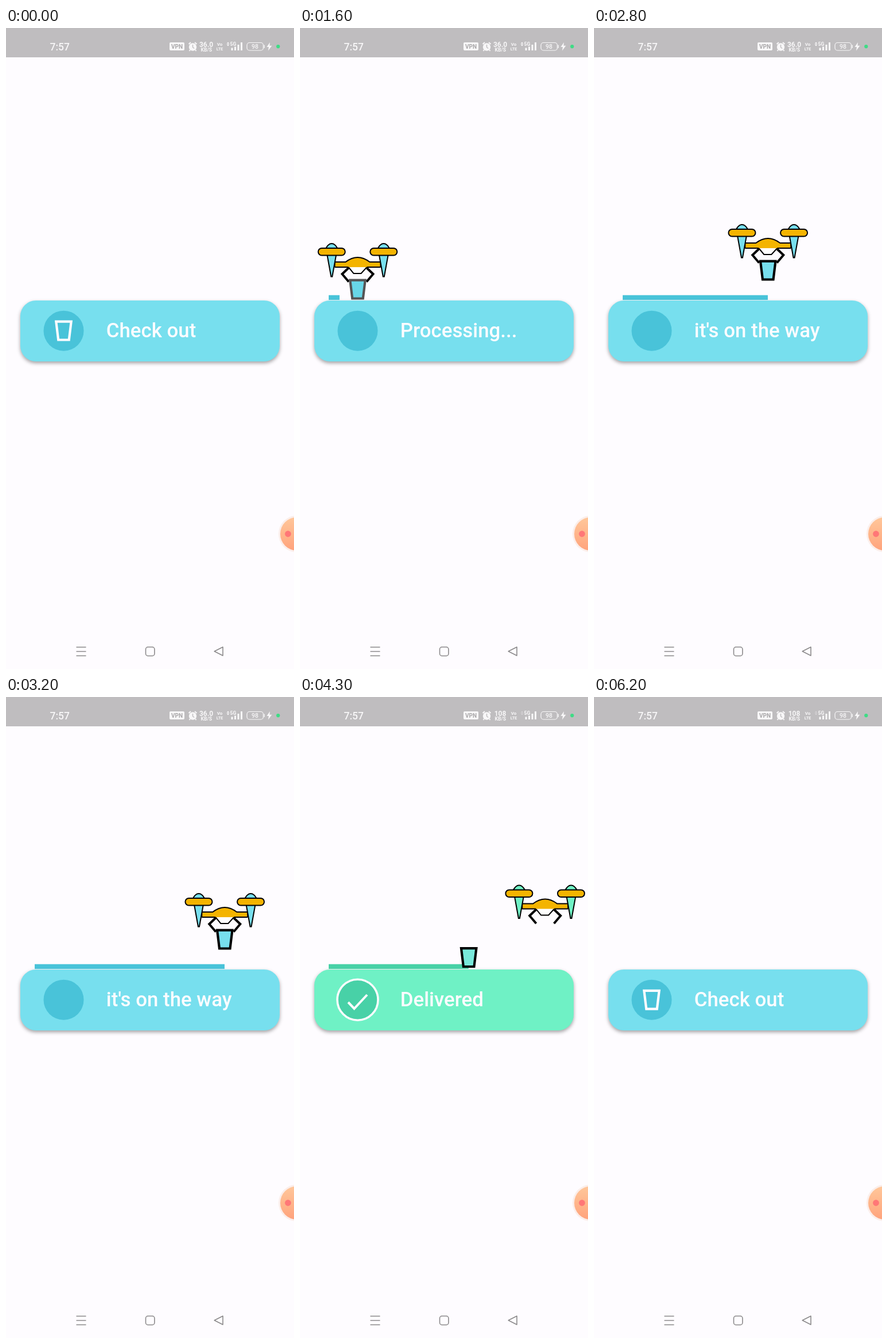
An HTML page for the animation above (6.4 s loop, 502 by 1115 pixels).

```html
<!DOCTYPE html>
<html lang="en">
<head>
<meta charset="utf-8">
<style>
html, body { margin: 0; width: 100%; height: 100%; overflow: hidden; background: #fefcff; }
svg { display: block; width: 502px; height: 1115px; font-family: Roboto, Inter, sans-serif; --main: #77dfee; --deep: #49c3d9; }
svg.done { --main: #6ff1c5; --deep: #48d1a7; }
#button { fill: var(--main); filter: drop-shadow(0 3px 3px rgba(0,0,0,.36)); }
#bar, #disc { fill: var(--deep); }
.done #disc { stroke: #fefcff; stroke-width: 3.6; r: 35.5px; }
#tick { display: none; }
.done #tick { display: inline; }
#label { font-size: 34.8px; font-weight: 500; fill: #fefcff; }
.blue { fill: var(--main); }
.gold { fill: #f4b400; }
#status { fill: #f8f7f8; font-weight: 700; }
</style>
</head>
<body>
<svg viewBox="0 0 502 1115">
  <defs>
    <linearGradient id="peach" x2="0" y2="1">
      <stop stop-color="#ffc79a"/><stop offset="1" stop-color="#ffa37c"/>
    </linearGradient>
    <g id="rotor" stroke="#000" stroke-width="2">
      <path class="blue" d="M-8 20H8L1 58.5H-1Z"/>
      <path class="blue" d="M-10.5 10Q-6 1 0 1T10.5 10Z"/>
      <rect class="gold" x="-23.5" y="9" width="47" height="12.5" rx="6.2"/>
    </g>
    <path id="arm" d="M16 43.5L27 54L15.5 67.5" fill="none" stroke="#000" stroke-width="4"/>
  </defs>
  <rect width="502" height="1115" fill="#fefcff"/>

  <rect id="button" x="25" y="474" width="452" height="106" rx="27"/>
  <circle id="disc" cx="100.5" cy="526.7" r="35"/>
  <path id="tick" d="M84 531L94.5 542L117 518" fill="none" stroke="#fefcff" stroke-width="4"/>
  <text id="label" x="174.8" y="538"></text>
  <rect id="bar" x="50" y="464.7" width="0" height="8.3"/>

  <g id="drone">
    <path d="M-16 42L-7 53H6L16 42" fill="#fff" stroke="#000" stroke-width="2"/>
    <path class="gold" d="M-40 33H-21Q0 17 21 33H40V42H-40Z"/>
    <path d="M-40 42V33H-21Q0 17 21 33H40V42M-40 42H-16M16 42H40" fill="none" stroke="#000" stroke-width="2"/>
    <use href="#rotor" x="-45.3"/><use href="#rotor" x="45.3"/>
    <use href="#arm"/><use href="#arm" transform="scale(-1 1)"/>
  </g>
  <path id="cup" d="M-13.2 2.2H13.2L9.3 34H-9.3Z" stroke-width="4.2"/>

  <rect width="502" height="51" fill="#bfbdbf"/>
  <g id="status">
    <text x="76.5" y="38.6" font-size="17.5" font-weight="500">7:57</text>
    <rect x="285" y="25" width="26" height="14" rx="2"/>
    <text x="298" y="35.7" font-size="10" text-anchor="middle" fill="#aaa8aa">VPN</text>
    <circle cx="325.5" cy="33" r="6.7"/>
    <path d="M318.5 28L322 25M332.5 28L329 25M321 38L319.5 40M330 38L331.5 40" stroke="#f8f7f8" stroke-width="2"/>
    <path d="M325.5 29V33.5L328 35.5" fill="none" stroke="#bfbdbf" stroke-width="1.4"/>
    <g text-anchor="middle">
      <text id="rate" x="349" y="33" font-size="12"></text>
      <text x="349.3" y="41" font-size="8.6">KB/S</text>
      <text x="372.5" y="31.3" font-size="8">Vo</text>
      <text x="372.5" y="39.2" font-size="7">LTE</text>
      <text x="396" y="31.3" font-size="8.6">5G</text>
      <text x="434" y="36.2" font-size="10.5" font-weight="500">98</text>
    </g>
    <path id="arrows" d="M384.5 27.2L387 24.4L389.5 27.2ZM384.5 28.6L387 31.4L389.5 28.6Z"/>
    <path d="M392.5 39V34.5H395.5V39ZM398 39V32.5H401V39ZM403.5 39V29H406.5V39ZM409 39V25H412V39Z"/>
    <rect x="420" y="25.5" width="28.5" height="13.5" rx="4.5" fill="none" stroke="#f8f7f8" stroke-width="1.2"/>
    <path d="M449.7 29.5V35H451V29.5ZM460 25L454.5 33H458L457 39.5L463.5 30.8H459.5Z"/>
    <circle cx="474.3" cy="32.2" r="3.1" fill="#3edc85"/>
  </g>

  <circle cx="507" cy="880" r="32" fill="#fbeeea"/>
  <circle cx="507" cy="880" r="29" fill="url(#peach)"/>
  <circle cx="491.5" cy="880" r="5.4" fill="#ff7777"/>
  <g fill="none" stroke="#8b898b" stroke-width="1.6">
    <path d="M122.5 1077H139.5M122.5 1084.5H139.5M122.5 1092H139.5"/>
    <rect x="243.5" y="1076.8" width="15.4" height="15.4" rx="4"/>
    <path d="M363.2 1084.3L378 1076.8V1091.8Z" stroke-linejoin="round"/>
  </g>
</svg>
<script>
const $ = id => document.getElementById(id);
const svg = document.querySelector('svg');
const LOOP = 6400, STEP = 100, REST = 508.5, GROUND = 374, HANG = 62.5;
const RELEASE = 3850, GREEN = 3450, BLUE = 4950;

// progress of t through a..b, limited to 0..1
const ramp = (t, a, b) => Math.min(1, Math.max(0, (t - a) / (b - a)));
const smooth = u => u * u * (3 - 2 * u);
const mix = (a, b, k) => `rgb(${a.map((v, i) => Math.round(v + (b[i] - v) * k))})`;
const place = (id, x, y) => $(id).setAttribute('transform', `translate(${x} ${y})`);

function labelAt(t) {
  if (t < 700 || t >= 5750) return 'Check out';
  if (t < 2200) return 'Processing...';
  return t < GREEN ? "it's on the way" : 'Delivered';
}

function barAt(t) {
  const p = t < 4050 ? ramp(t, 1503, 3436) : (1 - ramp(t, 4050, 5900)) ** 3;
  return 50 + 377 * p;
}

function droneTop(t) {
  if (t < 1500) return GROUND - 511 * (1 - ramp(t, 500, 1500)) ** 2;
  if (t < 4000) return GROUND - 33 * smooth(ramp(t, 1600, 2200)) + 31.5 * smooth(ramp(t, 3436, RELEASE));
  return GROUND - 1.5 - 511 * ramp(t, 4000, 5000) ** 2;
}

function cupTop(t) {
  if (t < 1500) return REST + (GROUND + HANG - REST) * smooth(ramp(t, 800, 1500));
  if (t < RELEASE) return droneTop(t) + HANG;
  const s = ramp(t, 4900, 5750) * .85;
  return 435 - 91 * s + 209 * s * s;
}

function draw(t) {
  const done = t >= GREEN && t < BLUE;
  const bar = barAt(t), x = Math.max(100.5, bar + .3);
  svg.setAttribute('class', done ? 'done' : '');
  $('label').textContent = labelAt(t);
  $('bar').setAttribute('width', bar - 50);
  place('drone', t < RELEASE ? x : 427.2, droneTop(t));
  place('cup', x, cupTop(t));
  const k = t < 3000 ? ramp(t, 1000, 1900) : 1 - ramp(t, 5100, 5750);
  $('cup').style.stroke = mix([254, 252, 255], [0, 0, 0], k);
  $('cup').style.fill = mix([73, 195, 217], done ? [120, 232, 218] : [119, 223, 238], k);
  $('rate').textContent = t < 3900 ? '36.0' : '108';
  $('arrows').style.opacity = t < 3900 ? 1 : .35;
}

const start = performance.now();
function tick() {
  const t = Math.max(0, performance.now() - start) % LOOP;
  draw(Math.floor(t / STEP) * STEP);
  requestAnimationFrame(tick);
}
tick();
</script>
</body>
</html>
```
